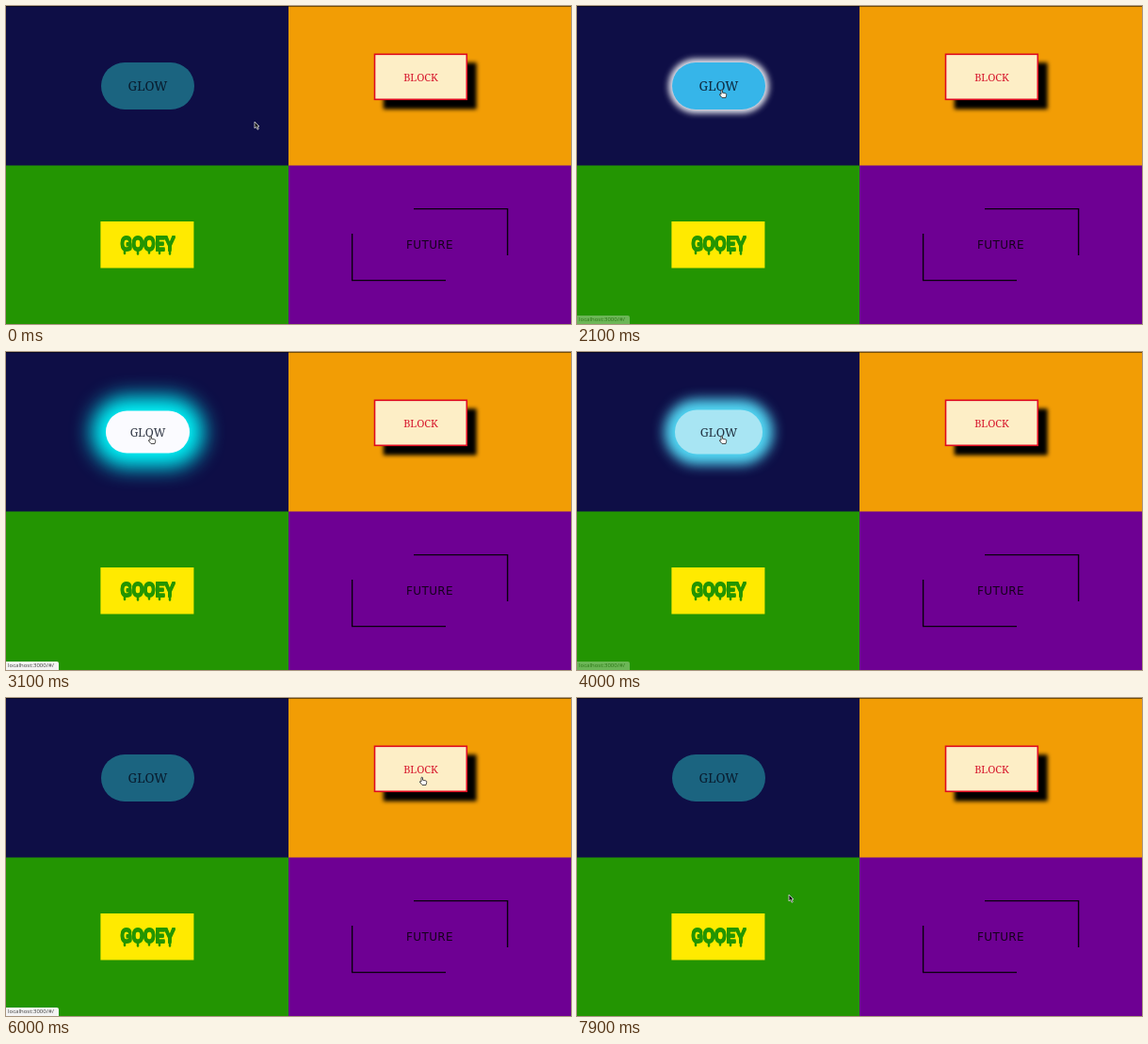
Recreate the animation shown at these times as an HTML page. Size 600 by 338 pixels, loop 8 s.

```html
<!DOCTYPE html>
<html lang="en">
<head>
<meta charset="utf-8">
<title>Four buttons</title>
<style>
html, body { margin: 0; width: 100%; height: 100%; overflow: hidden; }
#stage { position: relative; width: 600px; height: 338px; overflow: hidden; background: #000; }
#stage > * { position: absolute; box-sizing: border-box; }
svg { left: 0; top: 0; }
.button {
  display: flex; align-items: center; justify-content: center;
  width: 99px; height: 50px; white-space: nowrap;
}
#glow {
  left: 100.5px; top: 60px; border-radius: 25px;
  font: 300 13.5px "Noto Serif", serif; color: rgba(5, 12, 28, .82);
}
#block { left: 391px; top: 50px; font: 11px "Noto Serif", serif; color: #d6142a; }
#gooey {
  left: 100.5px; top: 228.5px;
  font: 900 19.5px Roboto, sans-serif; letter-spacing: -1.1px; color: #239502;
  text-shadow: 0 1.2px 0 #239502, 0 -1.2px 0 #239502;
}
#future {
  left: 400.5px; top: 229px;
  font: 12px "DejaVu Sans", sans-serif; letter-spacing: .4px; color: rgba(0, 0, 0, .82);
}
#status {
  left: 0; top: 329px; width: 56px; height: 9px; padding-left: 2px;
  background: #f4f4f4; color: #444; border-radius: 0 2px 0 0;
  font: 6px/9px "Noto Sans", sans-serif; white-space: nowrap;
}
</style>
</head>
<body>
<div id="stage">
  <svg width="600" height="338">
    <filter id="soft" x="-20%" y="-30%" width="140%" height="160%"><feGaussianBlur stdDeviation="2.2"/></filter>
    <rect y=".5" width="300" height="169.5" fill="#0e0e46"/>
    <rect x="300" y=".5" width="300" height="169.5" fill="#f29d05"/>
    <rect y="169.5" width="300" height="169" fill="#239502"/>
    <rect x="300" y="169.5" width="300" height="169" fill="#6e0093"/>
    <rect x="400.7" y="60.2" width="99" height="49.5" filter="url(#soft)"/>
    <rect x="391.5" y="51.3" width="97.8" height="48" fill="#fdeec6" stroke="#df0a20" stroke-width="1.6"/>
    <rect x="100.4" y="229" width="99" height="49.5" fill="#ffea00"/>
    <path d="M126 260v3M140 260v3.500M152 260v2.500M163 260v3M174 260v3.500" stroke="#239502" stroke-width="2.500" stroke-linecap="round"/>
    <path d="M433 215.600H532.600V265M367.600 242V291.600H467" fill="none" stroke="#08000c" stroke-width="1.400"/>
  </svg>
  <div id="glow" class="button">GLOW</div>
  <div id="block" class="button">BLOCK</div>
  <div id="gooey" class="button">GOOEY</div>
  <div id="future" class="button">FUTURE</div>
  <div id="status">localhost:3000/#/</div>
  <svg width="600" height="338">
    <g id="cursor">
      <path id="arrow" d="M0 0V7L1.700 5.500L3 8.300L4.300 7.700L3 5H5Z" fill="#151515" stroke="#ddd" stroke-width=".8"/>
      <path id="hand" d="M0 0.500Q1 -.5 1.500 .8V3.200L5 4Q6 4.300 5.700 5.500L5 8.500H1L-1.800 5Q-1.500 4 0 5Z" fill="#fff" stroke="#222" stroke-width=".8"/>
    </g>
  </svg>
</div>
<script>
const LOOP = 8000, STEP = 100;
const tracks = [];

// Each row is [time in ms, keyframe properties].
function track(id, rows) {
  const frames = [[0, rows[0][1]], ...rows, [LOOP, rows.at(-1)[1]]]
    .map(([time, props]) => ({ ...props, offset: time / LOOP }));
  const animation = document.getElementById(id).animate(frames, { duration: LOOP, fill: 'both' });
  animation.pause();
  tracks.push(animation);
}

const glow = (backgroundColor, scale, blur, spread, shadow) => ({
  backgroundColor,
  transform: `scale(${scale})`,
  boxShadow: `0 0 ${blur}px ${spread}px ${shadow}`
});
const rest = glow('#1b6480', 1, 0, 0, 'rgba(100,100,140,0)');
const peak = glow('#fbfbff', .9, 24, 17, '#00f4f8');
track('glow', [
  [1900, rest],
  [2100, glow('#36b5e9', 1, 6, 4, '#e6e8f0')],
  [2500, glow('#84d5f1', .95, 16, 10, '#70e5f5')],
  [3000, peak],
  [3700, peak],
  [4000, glow('#a8e5f3', .94, 14, 12, '#52d7f4')],
  [4300, glow('#4eaecb', .98, 8, 6, '#52a5c0')],
  [4600, glow('#217694', 1, 3, 1, '#454f77')],
  [4800, rest]
]);

const at = (x, y) => ({ transform: `translate(${x}px,${y}px)` });
track('cursor', [
  [0, at(264, 123)],
  [500, at(312, 141)],
  [700, at(312, 141)],
  [1000, at(194, 150)],
  [1100, at(194, 150)],
  [1900, at(153, 89)],
  [4100, at(153, 89)],
  [4600, at(287, 124)],
  [4700, at(300, 124)],
  [5500, at(441, 84)],
  [6700, at(441, 84)],
  [7400, at(345, 155)],
  [7900, at(225, 209)]
]);

const fade = opacity => ({ opacity });
track('status', [
  [2000, fade(0)], [2100, fade(.35)], [2300, fade(1)],
  [3850, fade(1)], [4000, fade(.35)], [4100, fade(0)],
  [5400, fade(0)], [5600, fade(1)],
  [6900, fade(1)], [7100, fade(0)]
]);

const pointing = [[1800, 4200], [5300, 6900]];
const show = (id, visible) => document.getElementById(id).style.display = visible ? '' : 'none';

let start;
function draw(now) {
  start ??= now;
  const time = Math.floor((now - start) % LOOP / STEP) * STEP;
  for (const animation of tracks) animation.currentTime = time;
  const hand = pointing.some(([from, to]) => time >= from && time < to);
  show('hand', hand);
  show('arrow', !hand);
  requestAnimationFrame(draw);
}
requestAnimationFrame(draw);
</script>
</body>
</html>
```
